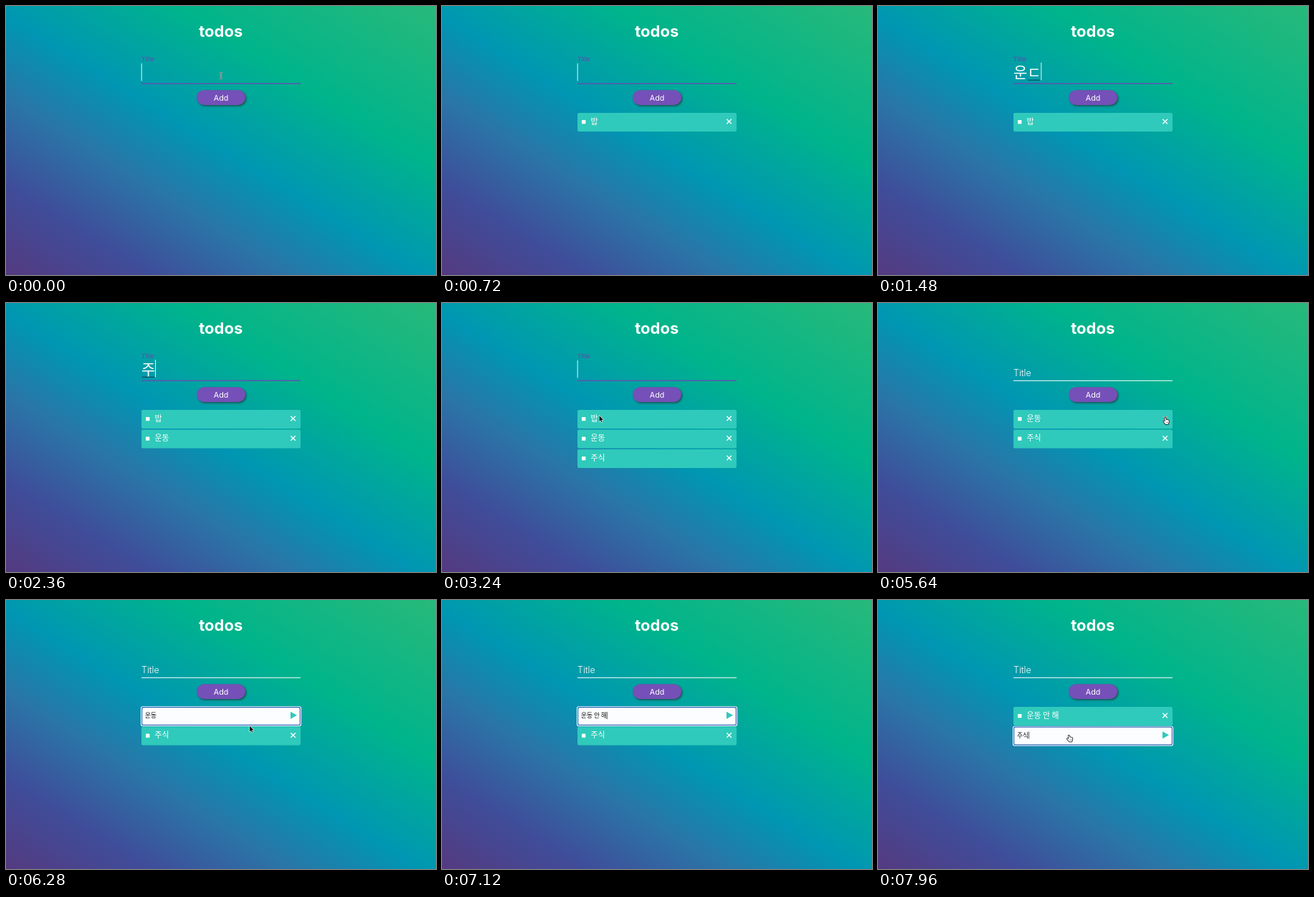
An HTML page with a canvas for the animation above (8 s loop, 600 px wide and 375 px high).

```html
<!DOCTYPE html>
<html lang="ko">
<head>
<meta charset="utf-8">
<title>todos</title>
<style>
  html, body { margin: 0; width: 100%; height: 100%; overflow: hidden; }
  canvas { display: block; width: 600px; height: 375px; }
</style>
</head>
<body>
<canvas id="stage"></canvas>
<script>
const W = 600, H = 375, LOOP = 8000;
const LATIN = 'Inter, Roboto, sans-serif';
const HANGUL = '"Noto Sans CJK KR", "Noto Sans CJK", "Noto Sans CJK JP", sans-serif';
const LEFT = 189, RIGHT = 411, ROW_TOP = 149, ROW_H = 26, PITCH = 27.5;
const TEAL = '#2fcabb', PURPLE = '#7550b8', FOCUS = '#5d55b0';
const BLUR_AT = 3500;

const canvas = document.getElementById('stage');
const ctx = canvas.getContext('2d');
const scale = window.devicePixelRatio || 1;
canvas.width = W * scale;
canvas.height = H * scale;

// Field contents: [time, settled text, syllable being composed]
const typing = [
  [0, '', ''], [160, '', 'ㅂ'], [280, '', '바'], [400, '', '밥'], [640, '', ''],
  [1000, '', 'ㅇ'], [1120, '', '우'], [1240, '', '운'], [1440, '운', 'ㄷ'],
  [1560, '운', '도'], [1680, '운', '동'], [1900, '', ''],
  [2150, '', 'ㅈ'], [2260, '', '주'], [2400, '주', 'ㅅ'], [2520, '주', '시'],
  [2640, '주', '식'], [2850, '', '']
];

const todos = [
  { text: '밥', from: 640, to: 5500, check: [3500, 4640] },
  { text: '운동', from: 1900, to: LOOP, check: [3760, 4820], edit: [5770, 7250],
    keys: [[5770, '운동'], [6480, '운동 '], [6580, '운동 ㅇ'], [6680, '운동 아'], [6780, '운동 안'],
           [6880, '운동 안 '], [6980, '운동 안 ㅎ'], [7080, '운동 안 해']] },
  { text: '주식', from: 2850, to: LOOP, check: [4000, 5000], edit: [7800, LOOP], keys: [[7800, '주식']] }
];

// Pointer stops: [time, x, y, shape from here on]
const path = [
  [0, 300, 97, 'beam'], [160, 300, 97, ''], [2950, 300, 100, 'arrow'],
  [3240, 219.5, 157, 'arrow'], [3420, 198, 162, 'hand'], [3560, 198, 162, 'hand'],
  [3720, 198, 190, 'hand'], [3820, 198, 190, 'hand'], [3960, 198, 217, 'hand'],
  [4140, 198, 217, 'hand'], [4480, 198, 162.5, 'hand'], [4680, 198, 162.5, 'hand'],
  [4790, 198, 190, 'hand'], [4860, 198, 190, 'hand'], [4970, 198, 217, 'hand'],
  [5060, 198, 217, 'hand'], [5400, 401, 160, 'hand'], [5650, 401, 160, 'hand'],
  [5760, 330, 162, 'hand'], [6000, 330, 162, 'arrow'], [6240, 340, 175.5, 'arrow'],
  [6480, 340, 175.5, ''], [7340, 340, 175.5, 'arrow'], [7500, 310, 184, 'hand'],
  [7680, 266.5, 188.5, 'hand'], [LOOP, 266.5, 188.5, 'hand']
];

const lastBefore = (list, t) => list.filter(k => k[0] <= t).pop();
const within = (span, t) => span && t >= span[0] && t < span[1];
const blinkOn = age => age % 1000 < 500;
const mix = (a, b, p) => a + (b - a) * p;
const ease = p => p * p * (3 - 2 * p);

function text(str, x, y, font, color, align = 'left') {
  ctx.font = font;
  ctx.fillStyle = color;
  ctx.textAlign = align;
  ctx.fillText(str, x, y);
  return ctx.measureText(str).width;
}

function box(x, y, w, h, r, color) {
  ctx.beginPath();
  ctx.roundRect(x, y, w, h, r);
  ctx.fillStyle = color;
  ctx.fill();
}

function line(points, color, width) {
  ctx.beginPath();
  points.forEach(([x, y]) => ctx.lineTo(x, y));
  ctx.strokeStyle = color;
  ctx.lineWidth = width;
  ctx.stroke();
}

function shape(points, fill, stroke, width) {
  ctx.beginPath();
  points.forEach(([x, y]) => ctx.lineTo(x, y));
  ctx.closePath();
  if (stroke) {
    ctx.strokeStyle = stroke;
    ctx.lineWidth = width;
    ctx.stroke();
  }
  ctx.fillStyle = fill;
  ctx.fill();
}

function drawBackground() {
  // Equal colours run parallel to the falling diagonal, as with "to right top"
  const gx = 1 / (2 * W), gy = -1 / (2 * H), n = gx * gx + gy * gy;
  const g = ctx.createLinearGradient(
    W / 2 - gx / n / 2, H / 2 - gy / n / 2, W / 2 + gx / n / 2, H / 2 + gy / n / 2);
  [[0, '#543a80'], [0.17, '#3f4d9a'], [0.33, '#2a75a7'], [0.48, '#0096b3'],
   [0.7, '#00b48b'], [1, '#28b97a']].forEach(([p, c]) => g.addColorStop(p, c));
  ctx.fillStyle = g;
  ctx.fillRect(0, 0, W, H);
}

function drawField(t) {
  const focused = t < BLUR_AT;
  const p = ease(Math.min(1, Math.max(0, (t - BLUR_AT) / 200)));
  text('Title', LEFT, mix(77, 102, p), `${focused ? 700 : 300} ${mix(8, 12.5, p)}px ${LATIN}`,
    focused ? FOCUS : '#fff');
  line([[LEFT, 108.3], [RIGHT, 108.3]], focused ? FOCUS : '#fff', focused ? 1.4 : 1);
  if (!focused) return;

  const [since, settled, composing] = lastBefore(typing, t);
  const font = `400 21px ${HANGUL}`;
  const start = LEFT + text(settled, LEFT, 99.5, font, '#fff');
  const end = start + text(composing, start, 99.5, font, '#fff');
  if (composing) {
    ctx.setLineDash([1, 0.6]);
    line([[start + 1, 103.3], [end - 1, 103.3]], '#123', 1.2);
    ctx.setLineDash([]);
  }
  if (blinkOn(t - since)) {
    const top = end > LEFT ? 79 : 80;
    ctx.fillStyle = '#fff';
    ctx.fillRect(end - 0.3, top, 0.9, 24.5);
  }
}

function drawButton() {
  ctx.save();
  ctx.shadowColor = 'rgba(40,50,50,.75)';
  ctx.shadowBlur = 3 * scale;
  ctx.shadowOffsetX = 1.5 * scale;
  ctx.shadowOffsetY = 1.5 * scale;
  box(266, 117.3, 68, 20.7, 10.3, PURPLE);
  ctx.restore();
  text('Add', 300, 131.5, `400 10.7px ${LATIN}`, '#fff', 'center');
}

function drawEditor(todo, y, t) {
  const [since, value] = lastBefore(todo.keys, t);
  box(LEFT - 1, y - 0.8, 224, ROW_H + 1.8, 2.5, '#fff');
  box(LEFT, y, 222, ROW_H, 2, '#3568b8');
  box(LEFT + 1.2, y + 1.2, 219.6, ROW_H - 2.4, 1.5, '#fcfdfe');
  const w = text(value, 194, y + 15.2, `500 8.7px ${HANGUL}`, '#111');
  if (blinkOn(t - since)) {
    ctx.fillStyle = '#111';
    ctx.fillRect(194 + w, y + 7, 0.7, 10);
  }
  shape([[397, y + 6.7], [406, y + 11.7], [397, y + 16.7]], TEAL);
}

function drawRow(todo, y, t, pointer) {
  if (within(todo.edit, t)) return drawEditor(todo, y, t);
  box(LEFT, y, 222, ROW_H, 2, TEAL);
  if (within(todo.check, t)) {
    box(194.2, y + 9, 6.8, 6.8, 1.3, '#1a6fd0');
    line([[195.9, y + 12.5], [197.1, y + 13.9], [199.3, y + 10.7]], '#fff', 0.9);
  } else {
    box(195, y + 9.9, 5.4, 5.4, 0.6, '#fff');
  }
  const renamed = todo.edit && t >= todo.edit[1];
  const label = renamed ? todo.keys[todo.keys.length - 1][1] : todo.text;
  text(label, 207.6, y + 15.7, `500 10.9px ${HANGUL}`, '#fff');

  const cx = 400.6, cy = y + 12, r = 3.3;
  const hover = Math.abs(pointer.x - cx) < 5 && Math.abs(pointer.y - cy) < 5;
  const color = hover ? '#cf9ba0' : '#fff';
  line([[cx - r, cy - r], [cx + r, cy + r]], color, 1.25);
  line([[cx + r, cy - r], [cx - r, cy + r]], color, 1.25);
}

function pointerAt(t) {
  let i = 0;
  while (i < path.length - 2 && path[i + 1][0] <= t) i++;
  const [t0, x0, y0, kind] = path[i], [t1, x1, y1] = path[i + 1];
  const p = ease((t - t0) / (t1 - t0));
  return { x: mix(x0, x1, p), y: mix(y0, y1, p), kind };
}

const pointers = {
  beam() {
    for (const [color, width] of [['#e8f4f2', 2], ['#1c2b2b', 0.9]]) {
      line([[0, -3.8], [0, 3.8]], color, width);
      line([[-1.8, -4], [1.8, -4]], color, width);
      line([[-1.8, 4], [1.8, 4]], color, width);
    }
  },
  arrow() {
    shape([[0, 0], [0, 8], [1.8, 6.4], [3, 9.2], [4.2, 8.7], [3, 6], [5.5, 5.8]], '#111', '#fff', 1.1);
  },
  hand() {
    shape([[-0.8, 0.2], [0.4, 0.2], [1, 3], [2.2, 2.7], [3.4, 3.2], [4.6, 3.5], [5, 5.2],
           [4.3, 7.5], [3.9, 9], [0.3, 9], [-1.2, 7], [-2.8, 5], [-2.1, 4.3], [-0.3, 5.2]],
      '#fff', '#111', 1.5);
    for (const x of [1.2, 2.4, 3.6]) line([[x, 5.7], [x, 7.7]], '#333', 0.4);
  }
};

function draw(t) {
  const pointer = pointerAt(t);
  ctx.setTransform(scale, 0, 0, scale, 0, 0);
  ctx.lineJoin = 'round';
  drawBackground();
  text('todos', 299.7, 42.5, `700 22px ${LATIN}`, '#fff', 'center');
  drawField(t);
  drawButton();
  const rows = todos.filter(d => t >= d.from && t < d.to)
    .map((todo, i) => ({ todo, y: ROW_TOP + i * PITCH }));
  rows.forEach(({ todo, y }) => drawRow(todo, y, t, pointer));
  if (pointer.kind) {
    ctx.translate(pointer.x, pointer.y);
    pointers[pointer.kind]();
  }
}

const begin = performance.now();
function tick() {
  draw((performance.now() - begin) % LOOP);
  requestAnimationFrame(tick);
}
tick();
</script>
</body>
</html>
```
